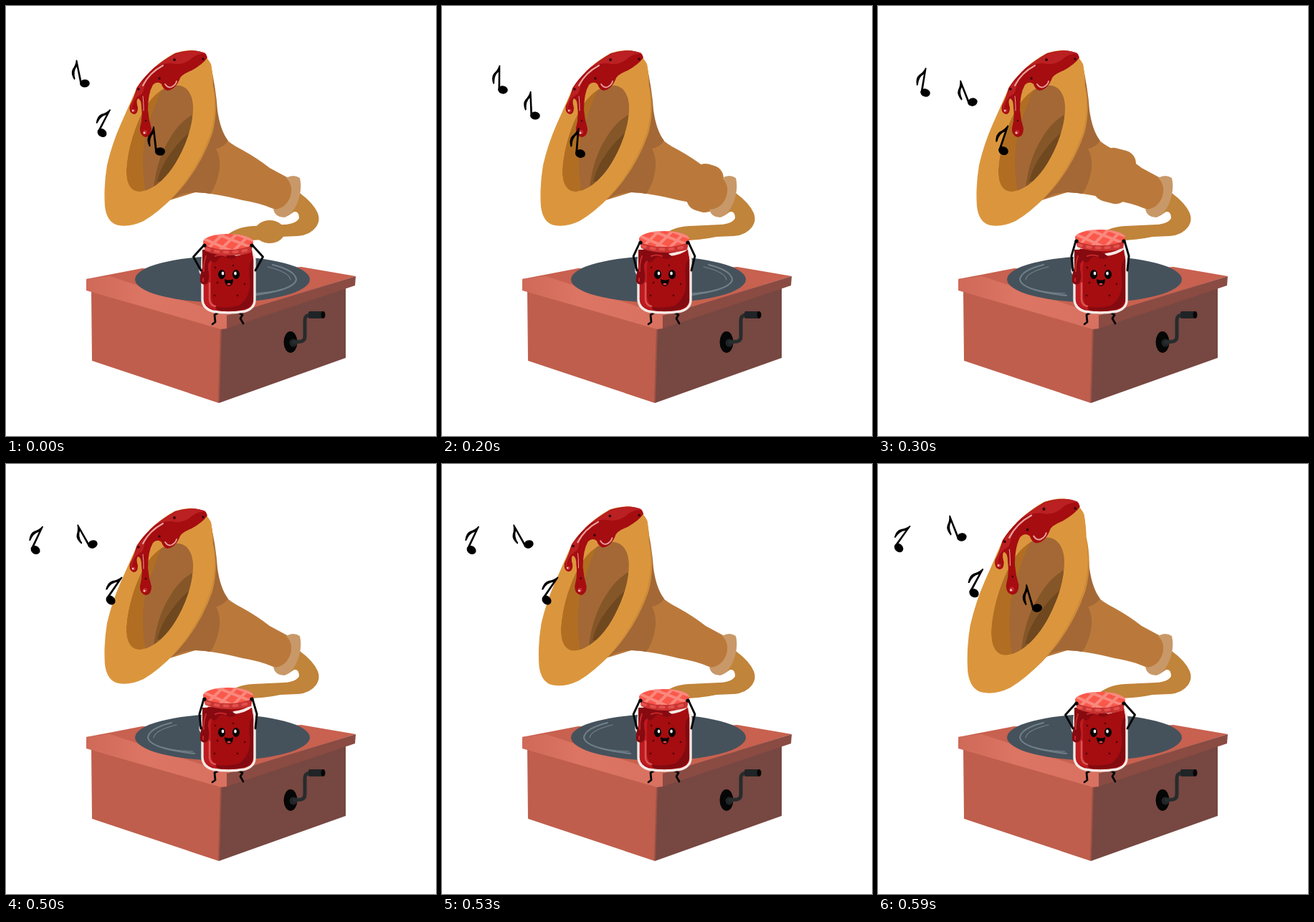
Animation, 600 px wide and 600 px high, one loop 690 ms. Source, as an HTML page:

```html
<!DOCTYPE html>
<html lang="en">
<head>
<meta charset="utf-8">
<title>Jam gramophone</title>
<style>
html, body { margin: 0; width: 100%; height: 100%; overflow: hidden; background: #fff; }
svg { display: block; width: 100vw; height: 100vh; }
.line { fill: none; stroke-linecap: round; stroke-linejoin: round; }
</style>
</head>
<body>
<svg viewBox="0 0 600 600">
  <defs>
    <linearGradient id="lip"><stop offset="0" stop-color="#cf6958"/><stop offset=".4" stop-color="#dc7563"/><stop offset="1" stop-color="#d87160"/></linearGradient>
    <clipPath id="mouth"><path id="mouthShape" d="M235 111C250 109 260 120 261 140C261 166 252 190 241 211C228 236 208 256 188 259C174 260 167 248 168 227C170 198 180 166 194 142C206 122 220 113 235 111Z"/></clipPath>
    <clipPath id="jamClip"><path d="M277 340H343L345 352V411Q341 422 328 424Q310 427 292 424Q278 421 276 411V352Z"/></clipPath>
    <clipPath id="lidClip"><ellipse cx="310" cy="329" rx="35" ry="11"/></clipPath>
    <g id="note">
      <ellipse rx="6.800" ry="5.600" transform="rotate(8)"/>
      <path d="M-6.6 1L-6.2 -25Q-12.500 -20 -11.8 -9L-13.5 -8Q-17 -18 -12.5 -23Q-7 -28 -5.2 -34.5L-3.700 -34L-3.800 0Z"/>
    </g>
  </defs>

  <!-- cabinet -->
  <path fill="#bf5e4c" d="M119 397L302 448L297 554L120 495Z"/>
  <path fill="#774741" d="M300 448L474 392V491L297 554Z"/>
  <path fill="none" stroke="#9b5146" stroke-width="2" d="M300 451L297 553"/>
  <path fill="#c8614f" d="M112 381L190 366L300 372L412 364L488 377L308 433Z"/>
  <path fill="url(#lip)" d="M112 381L145 377L308 431V450L300 451L112 397Z"/>
  <path fill="#8a4b43" d="M308 432L488 377L487 390L308 450Z"/>

  <!-- record -->
  <ellipse cx="302" cy="381.5" rx="122" ry="32.3" fill="#45525c"/>
  <g id="shine" class="line" stroke="#71808a">
    <path stroke-width="2" d="M372 361Q404 369 405 382Q402 397 340 404"/>
    <path stroke-width="1.2" d="M365 364Q395 371 397 382M386 395Q370 400 342 401"/>
  </g>

  <!-- crank -->
  <ellipse cx="397" cy="469" rx="9.5" ry="15" fill="#050606"/>
  <circle cx="401" cy="470" r="5.5" fill="#202426"/>
  <path class="line" stroke="#272c2d" stroke-width="5" d="M402 469L412 468Q417 467 417 461V438Q417 432 424 431"/>
  <rect x="422" y="426" width="22" height="10" rx="2" fill="#202426"/>
  <ellipse cx="442.500" cy="431" rx="3" ry="5" fill="#050606"/>

  <!-- tube -->
  <path fill="#c0843a" d="M410 261Q429 275 435 289Q439 299 433 308Q424 320 407 321L383 322Q360 327 335 327L303 324Q320 308 345 307L388 305Q405 304 409 296Q409 286 402 287L393 293Z"/>
  <ellipse id="lump" fill="#c0843a"/>

  <!-- horn neck -->
  <path fill="#ba793b" d="M280 180L303 182Q312 192 330 201Q350 212 368 226L394 240Q412 262 384 289L373 283Q355 275 330 271Q290 261 264 260L225 272Z"/>
  <rect id="bulge" rx="18"/>
  <path fill="#a36835" d="M285 80Q293 115 295 145Q299 174 310 188Q304 197 293 199Q299 210 298 225Q296 246 285 262Q256 256 236 267L205 280Z"/>
  <path fill="#c89868" d="M391 240Q401 234 410 240Q414 256 406 276Q398 293 388 295Q376 295 373 284Q391 283 397 265Q401 250 391 240Z"/>

  <!-- bell -->
  <g id="bell">
    <path fill="#ce8b39" d="M262 63Q277 64 286 82Q289 98 289 110Q297 144 288 178Q270 230 232 268Q205 294 180 304L200 200Z"/>
    <path fill="#db963d" d="M262 62Q277 64 286 81Q289 98 288 109Q295 144 285 178Q269 224 235 264Q213 288 192 300Q173 309 157 306Q141 303 138 280Q136 252 141 222Q148 192 160 165Q173 136 183 113Q205 82 235 66Q250 61 262 62Z"/>
    <g clip-path="url(#mouth)">
      <use href="#mouthShape" fill="#b16e22"/>
      <path fill="#a36835" d="M222 105Q202 148 193 190Q188 225 195 262H280V100Z"/>
      <path fill="#855628" d="M264 150Q244 159 229 184Q210 214 206 255H280V149Z"/>
      <path fill="#70481f" d="M262 172Q244 185 230 205Q216 223 211 245L250 240L266 180Z"/>
    </g>
    <path fill="#a50d10" d="M281 72Q275 81 259 90Q243 96 242 103Q236 117 225 118Q219 116 217 109Q211 104 205 110Q198 122 198 145Q199 158 203 171Q203 182 195 183Q186 181 187 170Q191 156 189 142Q189 130 184 129Q181 132 184 142Q184 151 178 151Q171 149 173 139Q180 125 182 115Q198 88 236 66Q265 58 279 67Z"/>
    <path fill="#bb2022" d="M279 66Q262 59 238 66Q214 78 199 93L211 84Q225 78 236 81Q250 82 260 72Q268 66 279 66ZM186 110Q181 122 175 136Q173 143 176 147Q175 135 183 127L190 122Q195 112 193 103Z"/>
    <g class="line" stroke="#e9a09c">
      <path stroke-width="2.2" d="M191 111Q200 93 219 83"/>
      <path stroke-width="1.8" d="M222 109Q226 115 231 113Q237 110 238 105"/>
      <path stroke-width="1" d="M191 126Q192 133 192 146"/>
    </g>
    <g fill="#c42a2d"><circle cx="194" cy="176" r="3"/><circle cx="178" cy="146" r="2.500"/></g>
    <g fill="#f4c9c4"><circle cx="193" cy="177" r="1.5"/><circle cx="177" cy="146" r="1.3"/></g>
    <g fill="#350507">
      <circle cx="235" cy="75" r="1.900"/><circle cx="214" cy="101" r="1.700"/><circle cx="185" cy="116" r="1.700"/>
      <circle cx="275" cy="74" r="1.700"/><circle cx="195" cy="160" r="1.2"/>
    </g>
  </g>

  <!-- jar -->
  <path class="line" stroke="#070707" stroke-width="2.800" d="M299 426L291 431L292 441L288 444M322 426L330 431L327 436L331 443"/>
  <path fill="#a10c10" stroke="#f5e9e5" stroke-width="3.4" d="M281 337Q273 347 274 361V410Q275 422 288 426Q310 430 333 426Q347 422 347 410V360Q348 347 340 337Z"/>
  <g clip-path="url(#jamClip)">
    <path fill="#a50d10" d="M270 336H350V430H270Z"/>
    <path fill="#bd1b20" d="M270 350H290Q285 358 286 372V405Q288 419 298 427H270Z"/>
    <path fill="#820a10" d="M350 352Q337 350 340 380Q343 405 325 418Q312 422 292 420L300 430H350Z"/>
    <path class="line" stroke="#d85552" stroke-width="2.500" d="M284 387V410Q285 418 292 419"/>
  </g>
  <path class="line" stroke="#f5e9e5" stroke-width="4" d="M318 347Q334 345 342 338"/>
  <path class="line" stroke="#eadedb" stroke-width="3" d="M271 367Q270 372 274 375"/>
  <path fill="#860a10" d="M274 340H305Q317 346 322 350Q314 356 305 350Q298 349 295 355Q290 361 286 355Q281 358 282 367Q285 381 281 387Q275 391 271 385Q270 377 274 365Z"/>
  <path class="line" stroke="#c6282c" stroke-width="2" d="M279 349Q275 360 276 370M275 380V384M292 349Q299 346 307 349"/>
  <g fill="#4a0508">
    <circle cx="295" cy="386" r="1.300"/><circle cx="291" cy="404" r="1.300"/><circle cx="323" cy="404" r="1.300"/>
    <circle cx="333" cy="388" r="1.200"/><circle cx="317" cy="362" r="1.200"/><circle cx="292" cy="365" r="1.200"/>
  </g>
  <g fill="#070405"><ellipse cx="301" cy="374.500" rx="5" ry="6.5"/><ellipse cx="321" cy="374.500" rx="5" ry="6.500"/></g>
  <g fill="#fff"><ellipse cx="302.500" cy="373" rx="1.800" ry="2.500"/><ellipse cx="320" cy="373" rx="1.800" ry="2.500"/></g>
  <path fill="#070405" d="M305 381Q311 384 317 381Q317 390 311 391Q305 390 305 381Z"/>
  <path fill="#e8443f" d="M308 388Q311 385 314 388Q311 391 308 388Z"/>

  <g id="lid">
    <path fill="#c83432" d="M275 329L278 342Q293 348 311 348Q330 348 342 344L345 329Z"/>
    <path class="line" stroke="#e2504b" stroke-width="4" stroke-dasharray="5 8" d="M279 339Q310 348 342 339"/>
    <ellipse cx="310" cy="329" rx="35" ry="11" fill="#fa584b"/>
    <path clip-path="url(#lidClip)" stroke="#f9b0a7" stroke-opacity=".55" stroke-width="4" d="M276 344L305 316M293 346L324 316M313 346L343 316M272 323L322 345M286 315L343 337M310 314L350 329"/>
  </g>
  <path id="arms" class="line" stroke="#070707" stroke-width="2.900"/>
  <g id="hands" fill="#070707"><circle r="2.600"/><circle r="2.600"/></g>

  <g id="notes"><use href="#note"/><use href="#note"/><use href="#note"/><use href="#note"/></g>
</svg>
<script>
const $ = id => document.getElementById(id);
const LOOP = 690;
const starts = [0, 100, 200, 300, 400, 500, 530, 560, 590];
const lift = [0, 2, 4, 6, 6, 6, 4, 2, 0];
const swell = [0, 0, 0, 0, 0, 0, .2, .4, 1];

// Each note: x, y, turn at the key steps; other steps lie between them.
const keySteps = [0, 2, 3, 5, 7, 8];
const paths = [
  [[110, 108, -12], [85, 117, 0], [66, 121, 9], [41, 120, 25], [41, 120, 25], [29, 117, 35]],
  [[134, 177, 27], [130, 153, -3], [132, 134, -22], [121, 112, -30], [121, 112, -30], [117, 102, -22]],
  [[215, 203, -7], [193, 206, 4], [175, 202, 18], [146, 190, 34], [146, 190, 34], [134, 180, 28]]
];
// Travelling swelling: in the tube, then in the neck.
const lumps = { 0: [368, 315, 21, 16], 1: [424, 296, 18, 18] };
const bulges = { 2: [367, 254, 44, 67], 3: [330, 237, 50, 76], 4: [301, 223, 54, 86] };

function set(el, attrs) {
  for (const k in attrs) el.setAttribute(k, attrs[k]);
}

function along(path, step) {
  let i = 0;
  while (i < keySteps.length - 2 && step >= keySteps[i + 1]) i++;
  const u = (step - keySteps[i]) / (keySteps[i + 1] - keySteps[i]);
  return path[i].map((v, k) => v + (path[i + 1][k] - v) * u);
}

function place(el, [x, y, turn], size = 1) {
  set(el, { transform: `translate(${x} ${y}) rotate(${turn}) scale(${size})` });
}

function draw(step) {
  const [lx, ly, rx, ry] = lumps[step] || [0, 0, 0, 0];
  set($('lump'), { cx: lx, cy: ly, rx, ry });

  const [bx, by, w, h] = bulges[step] || [0, 0, 0, 0];
  set($('bulge'), {
    x: -w / 2, y: -h / 2, width: w, height: h,
    fill: step === 4 ? '#a36835' : '#ba793b',
    transform: `translate(${bx} ${by}) rotate(15)`
  });

  const s = swell[step];
  set($('bell'), {
    transform: `translate(272 187) scale(${1 + .095 * s} ${1 + .108 * s}) translate(-272 -187)`
  });
  set($('shine'), { transform: step < 3 ? '' : 'translate(603 0) scale(-1 1)' });

  const up = lift[step];
  set($('lid'), { transform: `translate(0 ${-up})` });
  const out = 48.5 - up * 1.4, hand = 334 - up;
  const arm = side => `M${310 + side * 34} ${hand}L${310 + side * out} ${350 - up * .2}L${310 + side * 38} 369`;
  set($('arms'), { d: arm(-1) + arm(1) });
  [...$('hands').children].forEach((c, i) => set(c, { cx: i ? 343 : 277, cy: hand }));

  const notes = $('notes').children;
  paths.forEach((p, i) => place(notes[i], along(p, step), i === 2 ? 1.04 : 1));
  place(notes[3], [222, 201, -17], 1.04);
  set(notes[3], { visibility: step === 8 ? 'visible' : 'hidden' });
}

const begin = performance.now();
function tick() {
  const t = (performance.now() - begin) % LOOP;
  draw(starts.filter(s => s <= t).length - 1);
  requestAnimationFrame(tick);
}
draw(0);
tick();
</script>
</body>
</html>
```
